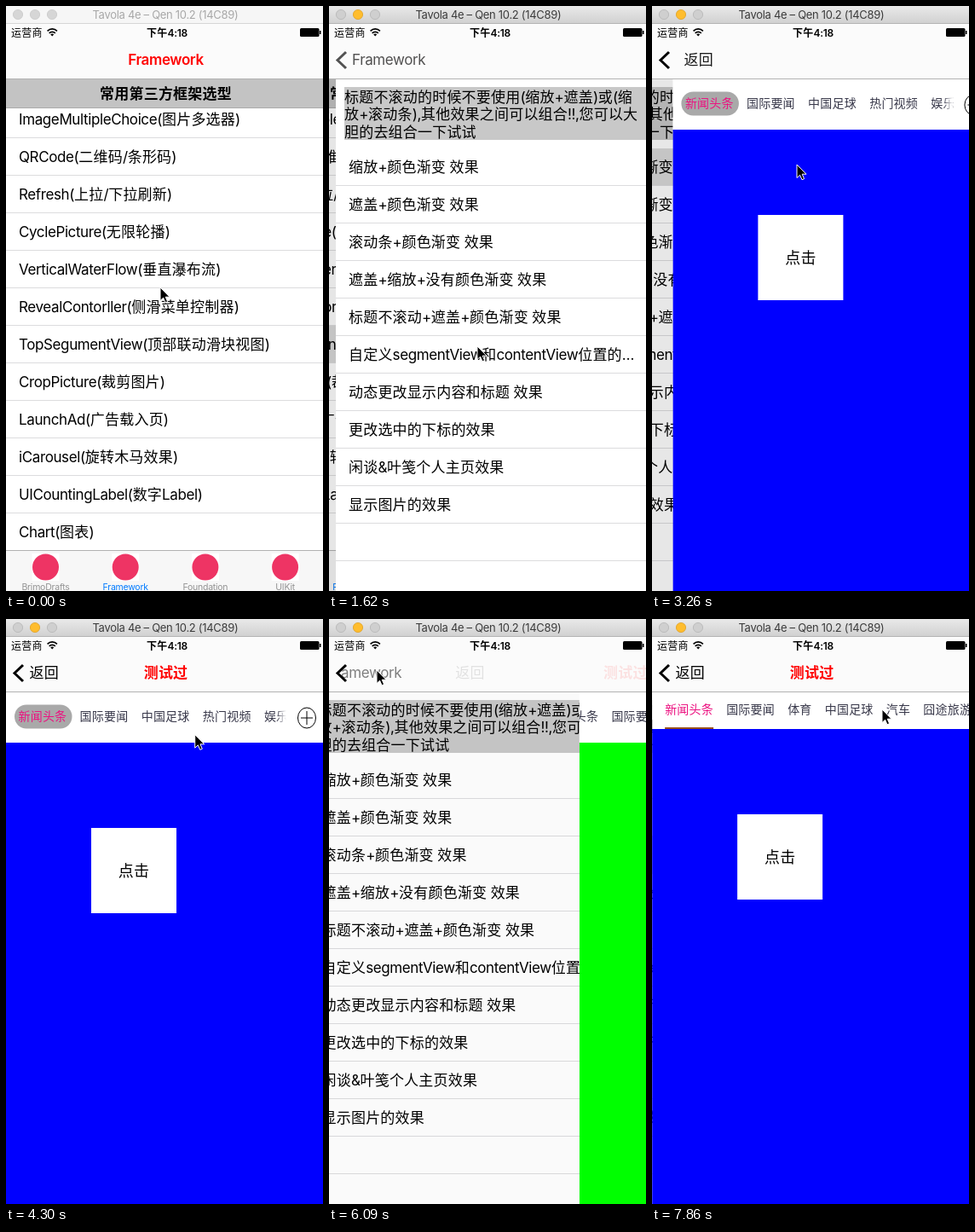
An HTML page for the animation above (8 s loop, 372 by 686 pixels).

```html
<!DOCTYPE html>
<html lang="zh-CN">
<head>
<meta charset="utf-8">
<title>Framework</title>
<style>
html, body { margin: 0; width: 100%; height: 100%; overflow: hidden; background: #fff; }
#stage { display: block; width: 372px; height: 686px; }
text { font-family: Inter, "Noto Sans CJK SC", "Noto Sans CJK", sans-serif; letter-spacing: .2px; }
.latin { letter-spacing: -.023em; }
</style>
</head>
<body>
<svg id="stage" viewBox="0 0 372 686"></svg>
<script>
const W = 372, LOOP = 8000;
const PINK = '#ec1280', TAB_INK = '#38384a';

// Markup helpers
const text = (s, x, y, size = 17, attrs = '') =>
  `<text x="${x}" y="${y}" font-size="${size}" ${attrs}>` +
  s.replace(/[ -~–…]+/g, m => `<tspan class="latin">${m.replace('&', '&amp;')}</tspan>`) + '</text>';
const rect = (x, y, w, h, fill, attrs = '') =>
  `<rect x="${x}" y="${y}" width="${w}" height="${h}" fill="${fill}" ${attrs}/>`;
const group = (id, body, attrs = '') => `<g id="${id}" ${attrs}>${body}</g>`;
const line = y => rect(0, y, W, 1, '#dcdcde');
const MID = 'text-anchor="middle"';

const rootRows = ['ImageMultipleChoice(图片多选器)', 'QRCode(二维码/条形码)', 'Refresh(上拉/下拉刷新)',
  'CyclePicture(无限轮播)', 'VerticalWaterFlow(垂直瀑布流)', 'RevealContorller(侧滑菜单控制器)',
  'TopSegumentView(顶部联动滑块视图)', 'CropPicture(裁剪图片)', 'LaunchAd(广告载入页)',
  'iCarousel(旋转木马效果)', 'UICountingLabel(数字Label)', 'Chart(图表)'];
const listRows = ['缩放+颜色渐变 效果', '遮盖+颜色渐变 效果', '滚动条+颜色渐变 效果', '遮盖+缩放+没有颜色渐变 效果',
  '标题不滚动+遮盖+颜色渐变 效果', '自定义segmentView和contentView位置的…', '动态更改显示内容和标题 效果',
  '更改选中的下标的效果', '闲谈&叶笺个人主页效果', '显示图片的效果'];
const note = ['标题不滚动的时候不要使用(缩放+遮盖)或(缩', '放+滚动条),其他效果之间可以组合!!,您可以大', '胆的去组合一下试试'];
const coverTabs = ['新闻头条', '国际要闻', '中国足球', '热门视频', '娱乐影视'];
const lineTabs = ['新闻头条', '国际要闻', '体育', '中国足球', '汽车', '囧途旅游'];
const bottomTabs = ['BrimoDrafts', 'Framework', 'Foundation', 'UIKit'];

function rootPage() {
  const rows = rootRows.map((s, i) => text(s, 15, 138.5 + 44 * i) + line(154 + 44 * i)).join('');
  const tabs = bottomTabs.map((s, i) => {
    const x = 46.5 + 93.7 * i;
    return rect(x - 16, 642, 32, 32, '#fff') + `<circle cx="${x}" cy="658" r="15.5" fill="#ee3464"/>` +
      text(s, x, 684.5, 10.5, `${MID} fill="${i === 1 ? '#007aff' : '#929292'}"`);
  }).join('');
  return rect(0, 85, W, 601, '#fff') + rect(0, 374, W, 44, '#d9d9d9', 'id="rootPick"') + rows +
    rect(0, 85, W, 35, '#c3c3c3') + rect(0, 119, W, 1, '#aaa') +
    text('常用第三方框架选型', 187.5, 109, 17, `${MID} font-weight="600"`) +
    rect(0, 638, W, 48, '#f7f7f7') + rect(0, 638, W, 1, '#b2b2b2') + tabs +
    rect(0, 85, W, 601, '#000', 'id="rootDim"');
}

function listPage() {
  return rect(0, 85, W, 601, '#fff') + rect(10, 95, 355, 62, '#c8c8c8') +
    note.map((s, i) => text(s, 10, 112.5 + 20.5 * i)).join('') +
    rect(0, 167, W, 43, '#d9d9d9', 'id="listPick"') +
    listRows.map((s, i) => text(s, 15, 194.5 + 44 * i)).join('') +
    Array.from({ length: 11 }, (_, i) => line(210 + 44 * i)).join('') +
    rect(0, 85, W, 601, '#000', 'id="listDim"');
}

const panel = (x, fill) => rect(x, 0, W, 601, fill) + rect(x + 100, 100, 100, 100, '#fff') +
  text('点击', x + 150, 156.5, 18, MID);

function coverPage() {
  const tabs = coverTabs.map((s, i) => text(s, 14.5 + 72.1 * i, 34, 14, 'class="tab"')).join('');
  return rect(0, 85, W, 60, '#fff') +
    `<svg y="85" width="${W}" height="60">` +
    group('strip', rect(0, 15.5, 67.5, 28, '#a9a9a9', 'id="pill" rx="14"') + tabs) +
    rect(317, 0, 12, 60, 'url(#fade)') + rect(329, 0, 43, 60, '#fff') +
    '<ellipse cx="353" cy="31" rx="10.5" ry="12" fill="none" stroke="#000"/>' +
    '<path d="M346 31h14M353 23v16" stroke="#000"/></svg>' +
    `<svg y="145" width="${W}" height="541">` +
    group('panels', ['#00f', '#0f0', '#ff8000', '#0f0'].map((c, i) => panel(W * i, c)).join('')) + '</svg>';
}

function linePage() {
  let x = 15;
  const tabs = lineTabs.map((s, i) => {
    const item = text(s, x, 26, 14, `fill="${i ? TAB_INK : PINK}"`);
    x += s.length * 14.2 + 15.2;
    return item;
  }).join('');
  return `<svg y="85" width="${W}" height="44">` + rect(0, 0, W, 44, '#fff') + tabs +
    rect(15, 42, 57, 2, '#96501e') + '</svg>' +
    `<svg y="129" width="${W}" height="557">` + panel(0, '#00f') + '</svg>';
}

function bars() {
  const lights = [14, 34, 54].map((x, i) =>
    `<circle id="light${i}" cx="${x}" cy="10" r="5.6" stroke-width=".8"/>`).join('');
  return rect(0, 20, W, 65, '#fbfbfb') + rect(0, 85, W, 1, '#b2b2b2') +
    text('运营商', 6, 35.5, 12) +
    '<g fill="none" stroke="#000" stroke-width="1.7"><path d="M48.600 29.300a8 8 0 0 1 11.300 0M50.700 31.800a5 5 0 0 1 7.100 0"/></g>' +
    '<path d="M54.200 35.500l-2-2.200a3 3 0 0 1 4 0z"/>' +
    text('下午4:18', 189, 35.5, 12, `${MID} font-weight="600"`) +
    rect(345, 26, 22.5, 10, '#000', 'rx="1.500"') + rect(368, 29, 1.5, 4, '#000') +
    rect(0, 0, W, 20, '#f6f6f6', 'id="chrome"') + rect(0, 20, W, 1, '#b9b9b9', 'id="chromeEdge"') + lights +
    text('Tavola 4e – Qen 10.2 (14C89)', 187, 15, 13, `${MID} id="caption"`) +
    group('rootTitle', text('Framework', 187.5, 69, 17, `${MID} font-weight="600" fill="#f00"`)) +
    '<g clip-path="url(#backClip)">' + group('backRoot', text('Framework', 27, 69)) + '</g>' +
    group('backList', text('返回', 27.5, 69)) +
    group('title', text('测试过', 187.5, 69, 17, `${MID} font-weight="600" fill="#f00"`)) +
    '<path id="chevron" d="M20 54L10 63.500L20 73" fill="none" stroke="#000" stroke-width="3"/>';
}

const stage = document.getElementById('stage');
stage.innerHTML =
  '<defs><linearGradient id="fade"><stop stop-color="#fff" stop-opacity="0"/><stop offset="1" stop-color="#fff"/></linearGradient>' +
  '<linearGradient id="metal" x2="0" y2="1"><stop stop-color="#e9e9e9"/><stop offset="1" stop-color="#d1d1d1"/></linearGradient>' +
  '<clipPath id="backClip"><rect x="13" y="40" width="359" height="45"/></clipPath></defs>' +
  group('root', rootPage()) + group('list', listPage()) + group('cover', coverPage()) +
  group('lined', linePage()) + bars() +
  '<path id="cursor" d="M0 0V15.500L3.600 12.200L6 17.700L8.600 16.600L6.200 11.200H11Z" stroke="#fff" stroke-width="1"/>';

const el = {};
stage.querySelectorAll('[id]').forEach(n => el[n.id] = n);
const tabs = [...stage.querySelectorAll('.tab')];

const bursts = [[0, 0, 1], [900, 1910, 8], [2060, 2060, 1], [2810, 2810, 1], [3110, 3850, 6],
  [4150, 5050, 7], [5200, 5500, 3], [5800, 6820, 8], [6970, 7860, 7]];
const steps = bursts.flatMap(([a, b, n]) =>
  Array.from({ length: n }, (_, i) => Math.round((a + (n > 1 ? i * (b - a) / (n - 1) : 0)) / 10) * 10));
const hold = t => steps.filter(s => s <= t).pop();

// Cursor path: [time, x, y]
const path = [[0, 181, 330], [900, 181, 333], [1190, 174, 399], [1620, 174, 399], [1910, 170, 217],
  [2060, 170, 186], [3410, 170, 186], [3850, 205, 150], [4150, 215, 140], [4750, 258, 112], [4850, 250, 110],
  [5050, 132.5, 79], [5500, 56, 60], [6200, 56, 60], [6820, 120, 280], [6970, 125, 287],
  [7150, 125, 287], [7860, 270, 106]];

const ease = u => (u = Math.min(1, Math.max(0, u)), u * u * (3 - 2 * u));
const slide = (t, start) => t < start ? 0 : t > start + 700 ? 1 : 1 - Math.exp(-(t - start) * .012);
const move = (n, x, y = 0) => n.setAttribute('transform', `translate(${x} ${y})`);
const fade = (n, o) => n.setAttribute('opacity', o);
const paint = (n, fill, stroke = 'none') => { n.setAttribute('fill', fill); n.setAttribute('stroke', stroke); };

function cursorAt(t) {
  const i = path.findIndex(k => k[0] > t);
  if (i < 0) return path[path.length - 1].slice(1);
  const [a, b] = [path[i - 1], path[i]];
  const u = ease((t - a[0]) / (b[0] - a[0]));
  return [a[1] + (b[1] - a[1]) * u, a[2] + (b[2] - a[2]) * u];
}

function draw(t) {
  const opened = slide(t, 1300);
  const cover = slide(t, 3033) - slide(t, 5960);
  const lined = slide(t, 7200);
  const deep = Math.max(cover, lined);

  // Page stack with parallax
  move(el.root, -.3 * W * opened);
  fade(el.rootDim, .1 * opened);
  fade(el.rootPick, t >= 1190 ? 1 : 0);
  move(el.list, W * (1 - opened) - .3 * W * deep);
  fade(el.listDim, .1 * deep);
  const third = t >= 6970;
  el.listPick.setAttribute('y', third ? 255 : 167);
  fade(el.listPick, third || t >= 2810 && t < 5960 ? 1 : 0);
  move(el.cover, W * (1 - cover));
  move(el.lined, W * (1 - lined));

  // Tapping the fourth tab
  const picked = t > 4800 ? 3 : 0;
  move(el.panels, Math.round(-3 * W * ease((t - 4800) / 312.8)));
  el.pill.setAttribute('x', 10 + 216.3 * ease((t - 4800) / 284));
  move(el.strip, -49 * ease((t - 5120) / 300));
  tabs.forEach((n, i) => n.setAttribute('fill', i === picked ? PINK : TAB_INK));

  // Navigation bar
  const backIn = opened ** 18;
  move(el.rootTitle, -116 * opened);
  fade(el.rootTitle, (1 - opened) ** 1.5);
  move(el.backRoot, -133.5 * deep);
  fade(el.backRoot, backIn * (1 - deep) ** 3);
  fade(el.chevron, backIn);
  move(el.backList, 153 * (1 - deep));
  fade(el.backList, deep ** 1.5);
  move(el.title, 203 * (1 - deep));
  fade(el.title, t > 3400 && t < 6900 || t > 7600 ? deep ** 1.5 : 0);

  // Window chrome gains focus on the first click
  const active = t >= 1190;
  paint(el.chrome, active ? 'url(#metal)' : '#f6f6f6');
  paint(el.chromeEdge, active ? '#b4b4b4' : '#d6d6d6');
  paint(el.caption, active ? '#3c3c3c' : '#a8a8a8');
  [0, 1, 2].forEach(i => active && i === 1
    ? paint(el.light1, '#ffbd2e', '#dfa023')
    : paint(el['light' + i], active ? '#cfcfcf' : '#d6d6d6', active ? '#b5b5b5' : '#c8c8c8'));

  move(el.cursor, ...cursorAt(t));
}

const begin = performance.now();
function tick() {
  draw(hold((performance.now() - begin) % LOOP));
  requestAnimationFrame(tick);
}
tick();
</script>
</body>
</html>
```
